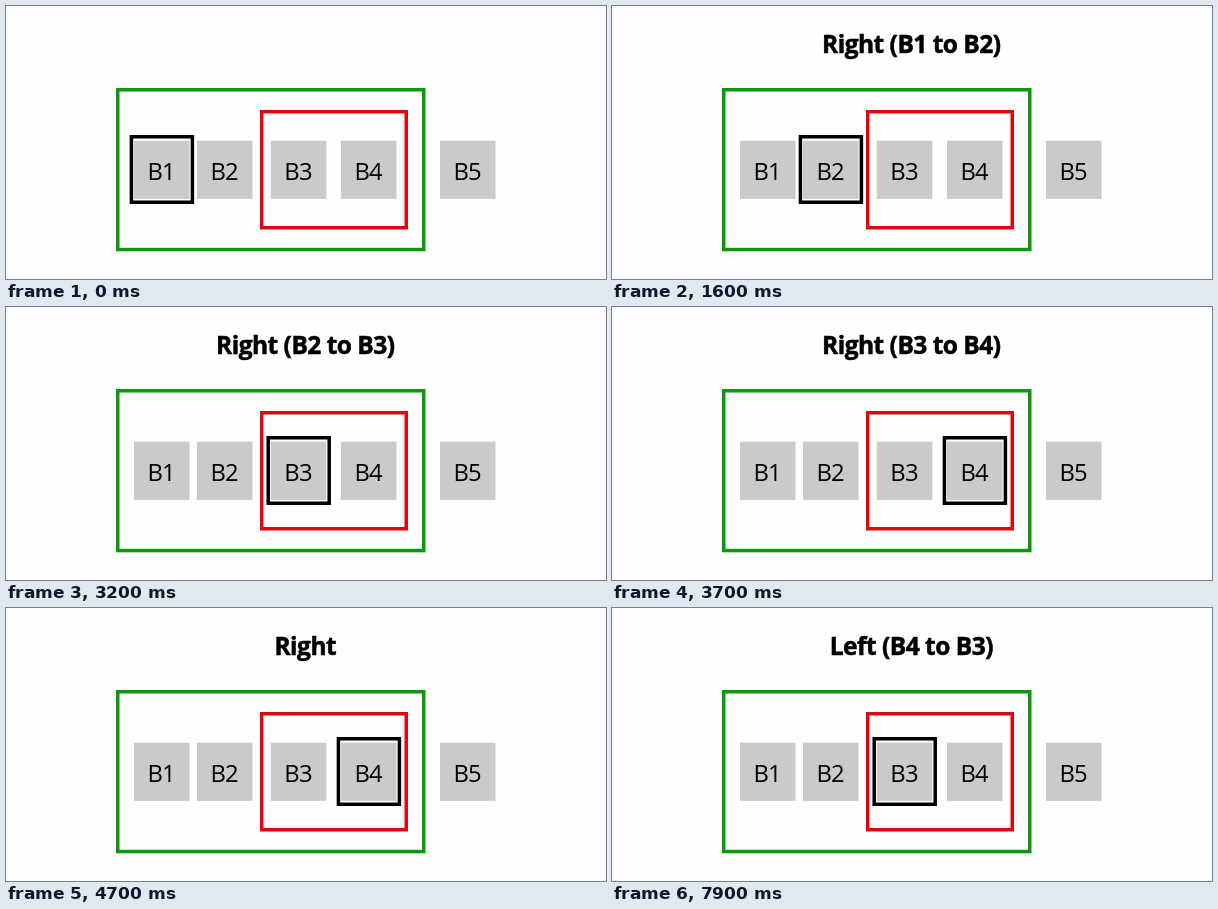
Animation of 600 by 273 pixels, one loop 8000 ms. Source, as an HTML page:

```html
<!DOCTYPE html>
<html lang="en">
<head>
<meta charset="utf-8">
<title>Focus navigation</title>
<style>
  html, body { margin: 0; width: 100%; height: 100%; overflow: hidden; background: #fefdff; }
  svg { display: block; width: 100%; height: 100%; }
  text { font-family: "Open Sans", "Noto Sans", sans-serif; text-anchor: middle; }
  .button rect { fill: #cbc9cb; }
  .button text { font-size: 23.8px; letter-spacing: -.8px; }
  .frame { fill: none; stroke-width: 3.5; }
  #title { font-size: 24.5px; font-weight: 700; letter-spacing: -.5px; stroke: #000; stroke-width: .5; }
</style>
</head>
<body>
<svg viewBox="0 0 600 273">
  <rect class="frame" x="111.75" y="83.75" width="306" height="159.8" stroke="#0c980c"/>
  <rect class="frame" x="255.75" y="105.75" width="144.5" height="116" stroke="#dc0a10"/>
  <g id="buttons"></g>
  <rect id="focus" class="frame" y="130.75" width="61" height="65.5" stroke="#000"/>
  <text id="title" x="299.3" y="46.5"></text>
</svg>
<script>
  const LOOP = 8000;
  const buttonX = { B1: 128, B2: 191, B3: 264.8, B4: 335, B5: 434 };
  // start time in ms, focused button, title
  const steps = [
    [0, 'B1', ''],
    [1300, 'B2', 'Right (B1 to B2)'],
    [2500, 'B3', 'Right (B2 to B3)'],
    [3700, 'B4', 'Right (B3 to B4)'],
    [4600, 'B4', 'Right'],
    [7900, 'B3', 'Left (B4 to B3)']
  ];
  const byId = id => document.getElementById(id);
  const focus = byId('focus'), title = byId('title');

  byId('buttons').innerHTML = Object.entries(buttonX).map(([name, x]) =>
    `<g class="button"><rect x="${x}" y="134.7" width="55.5" height="58.2"/>
     <text x="${x + 27.2}" y="174">${name}</text></g>`).join('');

  let current;
  function show(step) {
    if (step === current) return;
    current = step;
    const [, name, label] = step;
    focus.setAttribute('x', buttonX[name] - 2.6);
    title.textContent = label;
  }

  function draw() {
    const t = performance.now() % LOOP;
    show(steps.findLast(([start]) => start <= t));
    requestAnimationFrame(draw);
  }
  draw();
</script>
</body>
</html>
```
